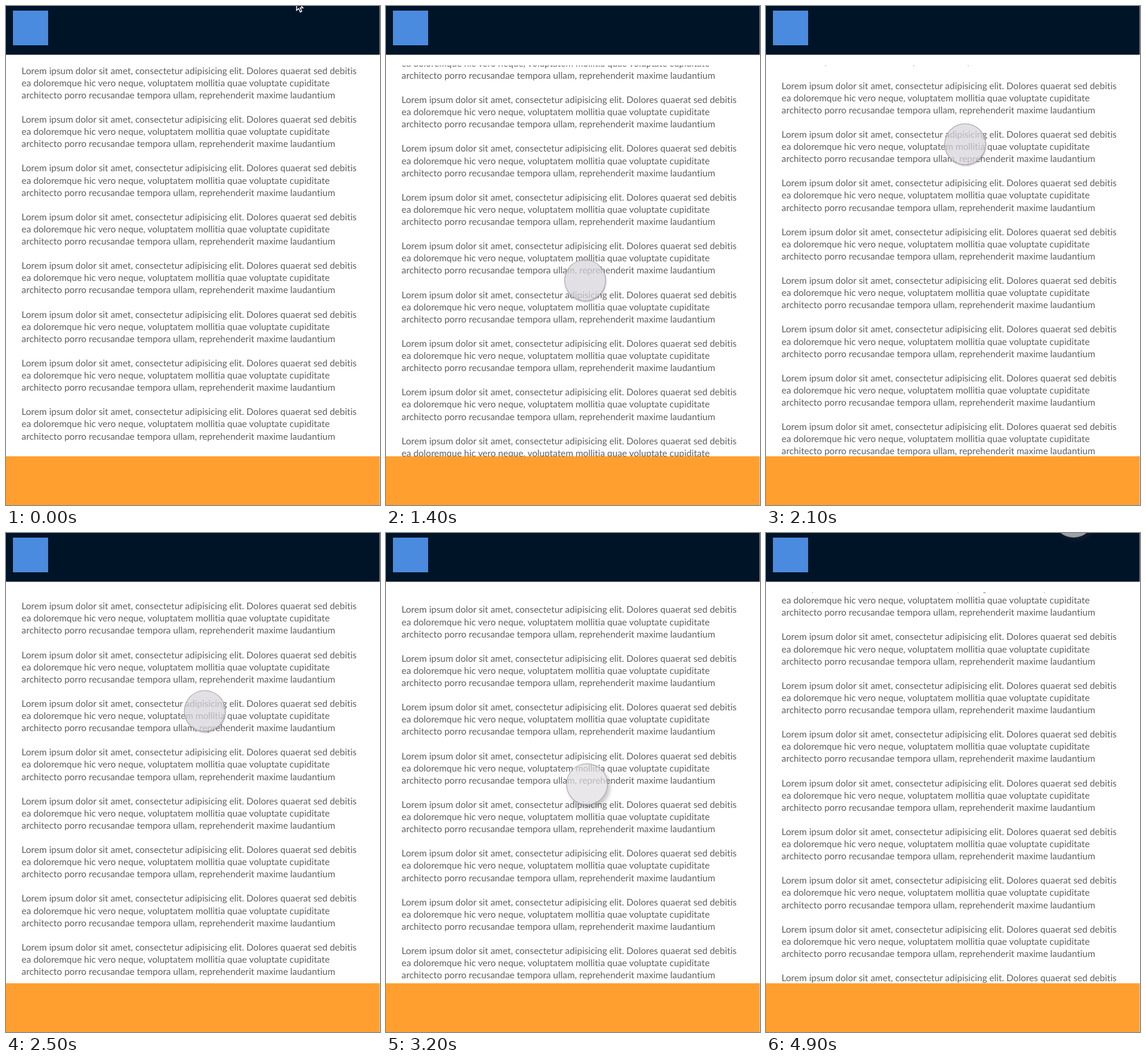
An HTML page for the animation above (5000 ms loop, 648 px wide and 864 px high).

```html
<!DOCTYPE html>
<html lang="la">
<head>
<meta charset="utf-8">
<title>Scrolling text</title>
<style>
html, body { margin: 0; width: 100%; height: 100%; overflow: hidden; background: #fff; }
#stage { position: relative; width: 648px; height: 864px; overflow: hidden; }
#stage > * { position: absolute; left: 0; top: 0; }
#stage > #view { top: 103px; width: 648px; height: 677px; overflow: hidden; }
#text {
  position: absolute; left: 27px; top: -1.3px; white-space: pre;
  font: 15.93px/21.1px Lato, sans-serif; color: #606060;
  font-variant-ligatures: none; text-rendering: geometricPrecision;
}
#touch {
  width: 72px; height: 72px; margin: -36px; box-sizing: border-box;
  border-radius: 50%; border: 1.5px solid rgba(135, 131, 136, .75);
  background: rgba(224, 221, 226, .7);
  box-shadow: 4px 5px 6px rgba(60, 50, 70, .28);
}
#touch.down {
  background: rgba(216, 213, 219, .72);
  box-shadow: 1px 2px 2px rgba(60, 50, 70, .28);
}
</style>
</head>
<body>
<div id="stage">
  <svg width="648" height="864">
    <rect width="647.5" height="84.4" fill="#001427"/>
    <rect x="12" y="8" width="61" height="60" fill="#4a8be0"/>
    <rect y="779.6" width="647.5" height="84.4" fill="#ff9f2f"/>
    <path id="arrow" d="M503.5 -9V7.5L507 4.5L509.8 10.5L512.4 9.3L509.8 3.3H514.6Z" fill="#001427" stroke="#fff" stroke-width="1.5"/>
  </svg>
  <div id="view"><div id="text"></div></div>
  <div id="touch"></div>
</div>
<script>
const LOOP = 5000, STEP = 100;
const $ = id => document.getElementById(id);
const paragraph = `Lorem ipsum dolor sit amet, consectetur adipisicing elit. Dolores quaerat sed debitis
ea doloremque hic vero neque, voluptatem mollitia quae voluptate cupiditate
architecto porro recusandae tempora ullam, reprehenderit maxime laudantium

`;
$('text').textContent = paragraph.repeat(16);

const smooth = p => p * p * (3 - 2 * p);
const easeOut = power => p => 1 - (1 - p) ** power;

// Progress from 0 to 1 between two times
const during = (t, from, to, ease = smooth) =>
  ease(Math.min(1, Math.max(0, (t - from) / (to - from))));

// Enter, drag up, drag down, leave
function touchAt(t) {
  const enter = during(t, 0, 600), up = during(t, 1260, 1850), down = during(t, 2079, 3178);
  return {
    x: 505 - 160 * enter - 2 * down + 190 * during(t, 3180, 4800, easeOut(2.25)),
    y: 514 * enter - 275 * up + 211 * down - 478 * during(t, 3180, 4800, easeOut(2.58)),
    pressed: (t >= 1100 && t < 1800) || (t >= 2079 && t < 3178)
  };
}

// The page follows each drag and glides on after it
const scrollAt = t => 417 * during(t, 1238, 2160) - 315.6 * during(t, 1857, 3631);

function draw(now) {
  const t = Math.floor(now % LOOP / STEP) * STEP;
  const { x, y, pressed } = touchAt(t);
  $('text').style.transform = `translateY(${-scrollAt(t)}px)`;
  $('arrow').style.display = t < STEP ? '' : 'none';
  $('touch').style.display = t < STEP ? 'none' : '';
  $('touch').style.transform = `translate(${x}px, ${y}px)`;
  $('touch').className = pressed ? 'down' : '';
}

let start;
function frame(now) {
  start ??= now;
  draw(now - start);
  requestAnimationFrame(frame);
}
draw(0);
requestAnimationFrame(frame);
</script>
</body>
</html>
```
